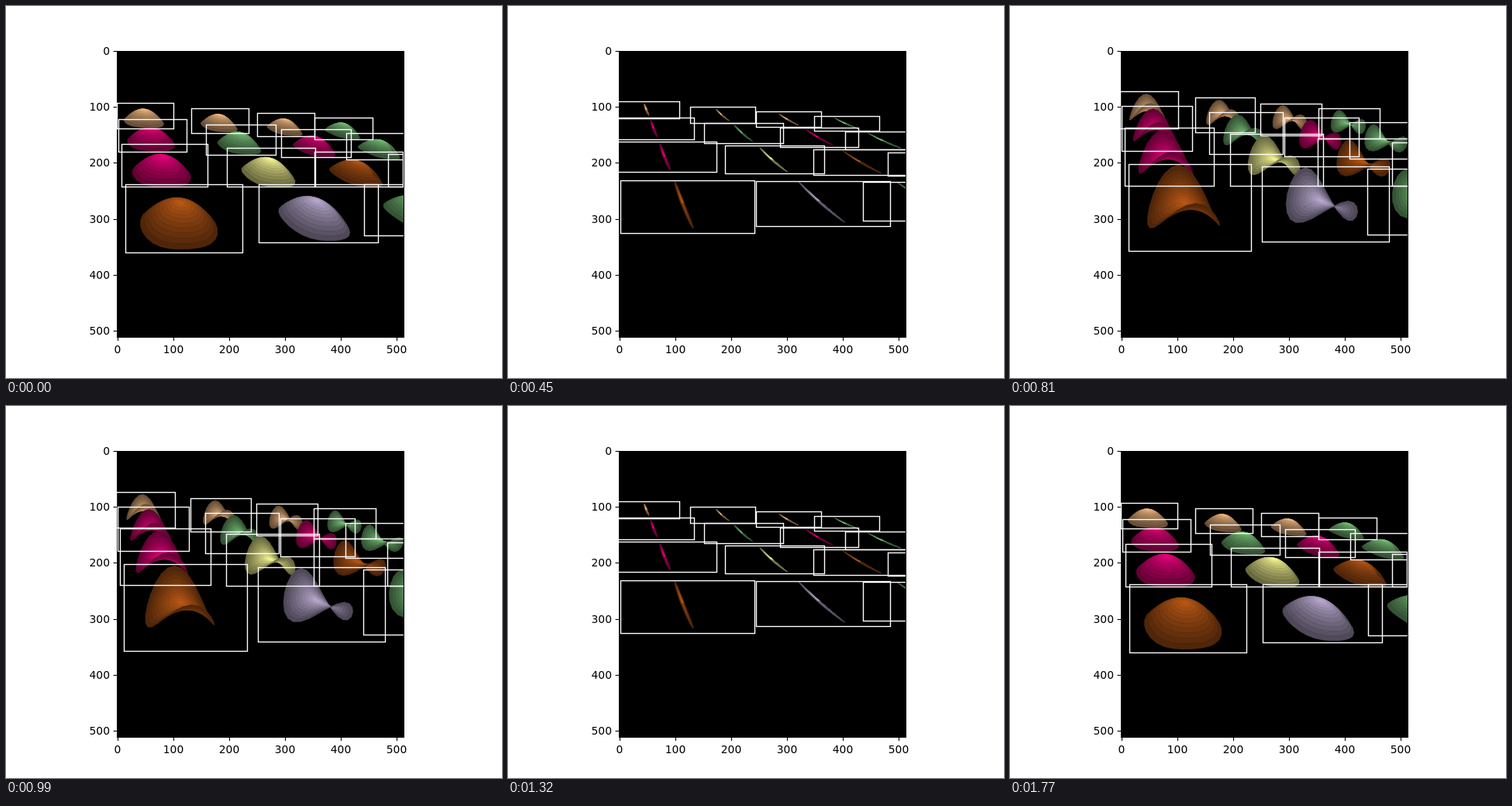
These frames come from a looping animation (640 px wide and 480 px high, 1800 ms). An HTML page:

```html
<!DOCTYPE html>
<html>
<head>
<meta charset="utf-8">
<style>
html, body { margin: 0; width: 100%; height: 100%; overflow: hidden; background: #fff; }
svg { display: block; }
text { font: 13.89px "DejaVu Sans", sans-serif; }
</style>
</head>
<body>
<svg width="640" height="480" viewBox="0 0 640 480">
  <defs><clipPath id="plot"><rect x="143" y="58" width="370" height="369"/></clipPath></defs>
  <rect x="143" y="58" width="371" height="370"/>
  <g id="axes"></g>
  <g clip-path="url(#plot)">
    <g id="surfaces" stroke-width="0.5"></g>
    <g id="boxes" fill="none" stroke="#fff" stroke-width="1.39"></g>
  </g>
</svg>
<script>
const STEP = 30, FRAMES = 60, LAST = FRAMES / 2 - 1;
const RINGS = 11, SLICES = 14;
const el = id => document.getElementById(id);

function add(parent, name, attrs, text) {
  const node = document.createElementNS('http://www.w3.org/2000/svg', name);
  for (const key in attrs) node.setAttribute(key, attrs[key]);
  if (text !== undefined) node.textContent = text;
  parent.appendChild(node);
  return node;
}

// Ticks and labels
for (let v = 0; v <= 500; v += 100) {
  const shift = (v + 0.5) * 369.6 / 512;
  const x = Math.round(143.2 + shift), y = Math.round(57.6 + shift);
  const tick = d => add(el('axes'), 'path', { d, stroke: '#000', 'stroke-width': 1.11 });
  tick(`M${x + 0.5} 427v5`);
  tick(`M143.5 ${y + 0.5}h-5`);
  add(el('axes'), 'text', { x, y: 448, 'text-anchor': 'middle' }, v);
  add(el('axes'), 'text', { x: 134, y: y + 5, 'text-anchor': 'end' }, v);
}

// Camera: the directions of the world axes, and the nearest left grid cell
const FOCAL = 507.7, CENTER = [328.8, 242.4];
const RIGHT = [0.9292, -0.0065, 0.3694];
const AWAY = [-0.333, -0.3879, 0.8562];
const UP = [0.1377, -0.922, -0.3626];
const ORIGIN = [-0.539, 0.2013, 2.6];
const COL_GAP = 1.006, ROW_GAP = 0.98;

function project(x, y, z) {
  const [px, py, depth] = ORIGIN.map((o, k) => o + x * RIGHT[k] + y * AWAY[k] + z * UP[k]);
  return [CENTER[0] + FOCAL * px / depth, CENTER[1] + FOCAL * py / depth];
}

const COLORS = {
  tan: [253, 192, 134], green: [127, 201, 127], pink: [240, 2, 127],
  yellow: [255, 255, 153], brown: [191, 91, 23], violet: [190, 174, 212]
};
const ROWS = [
  ['brown', 'violet', 'green'],
  ['pink', 'yellow', 'brown', 'yellow'],
  ['pink', 'green', 'pink', 'green'],
  ['tan', 'tan', 'tan', 'green']
];

// Half rings in painting order: far half from the rim inward, near half outward
function makeBands(rgb) {
  const band = (ring, side) => {
    const light = 0.96 - 0.54 * ring / (RINGS - 1);
    const color = `rgb(${rgb.map(c => Math.round(c * light))})`;
    return { ring, side, path: add(el('surfaces'), 'path', { fill: color, stroke: color }) };
  };
  const order = [...Array(RINGS).keys()];
  return [...order.map(k => band(RINGS - 1 - k, 1)), ...order.map(k => band(k, -1))];
}

const items = [];
for (let row = 3; row >= 0; row--) {
  for (let col = ROWS[row].length - 1; col >= 0; col--) {
    items.push({
      x: col * COL_GAP,
      y: row * ROW_GAP,
      bands: makeBands(COLORS[ROWS[row][col]]),
      box: add(el('boxes'), 'rect', {})
    });
  }
}

// A sheet of fixed length bends along its depth from a dome into a saddle
const LENGTH = 0.3705, MAX_BEND = 0.895, CENTER_Z = 0.155;

const drop = (bend, t) => LENGTH * (1 - Math.cos(bend * t)) / bend;
const reach = (bend, t) => LENGTH * Math.sin(bend * t) / bend;

function drawBox({ x, y, box }, bend) {
  const half = reach(bend, 1);
  const bottom = CENTER_Z - drop(Math.abs(bend), 1);
  const top = CENTER_Z + Math.max(0, -drop(bend, 1));
  const xs = [], ys = [];
  for (const i of [-half, half]) for (const j of [-half, half]) for (const z of [bottom, top]) {
    const [px, py] = project(x + i, y + j, z);
    xs.push(px);
    ys.push(py);
  }
  const snap = v => Math.floor(v) + 0.5;
  const left = snap(Math.min(...xs)), upper = snap(Math.min(...ys));
  box.setAttribute('x', left);
  box.setAttribute('y', upper);
  box.setAttribute('width', snap(Math.max(...xs)) - left);
  box.setAttribute('height', snap(Math.max(...ys)) - upper);
}

function quad(a, b, c, d) {
  const area = (c[0] - a[0]) * (d[1] - b[1]) - (d[0] - b[0]) * (c[1] - a[1]);
  const corners = area < 0 ? [d, c, b, a] : [a, b, c, d];
  return 'M' + corners.map(p => p[0].toFixed(1) + ' ' + p[1].toFixed(1)).join('L') + 'Z';
}

function drawSurface({ x, y, bands }, bend) {
  const curl = Math.abs(bend), width = 0.246 * curl / MAX_BEND;
  const point = (radius, angle) => {
    const u = radius * Math.cos(angle), v = radius * Math.sin(angle);
    return project(x + width * u, y + reach(bend, v), CENTER_Z - drop(curl, u) - drop(bend, v));
  };
  for (const { ring, side, path } of bands) {
    const edge = radius => Array.from({ length: SLICES + 1 },
      (_, k) => point(radius, side * Math.PI * k / SLICES));
    const inner = edge(ring / RINGS), outer = edge((ring + 1) / RINGS);
    let d = '';
    for (let k = 0; k < SLICES; k++) d += quad(inner[k], inner[k + 1], outer[k + 1], outer[k]);
    path.setAttribute('d', d);
  }
}

let shown = -1;
function render(time) {
  const index = Math.floor(time / STEP) % FRAMES;
  if (index === shown) return;
  shown = index;
  const phase = 1 - 2 * Math.min(index, FRAMES - 1 - index) / LAST;
  const bend = MAX_BEND * Math.sin(1.2 * phase) / Math.sin(1.2);
  for (const item of items) {
    drawSurface(item, bend);
    drawBox(item, bend);
  }
}

const start = performance.now();
function loop() {
  render(performance.now() - start);
  requestAnimationFrame(loop);
}
loop();
</script>
</body>
</html>
```
